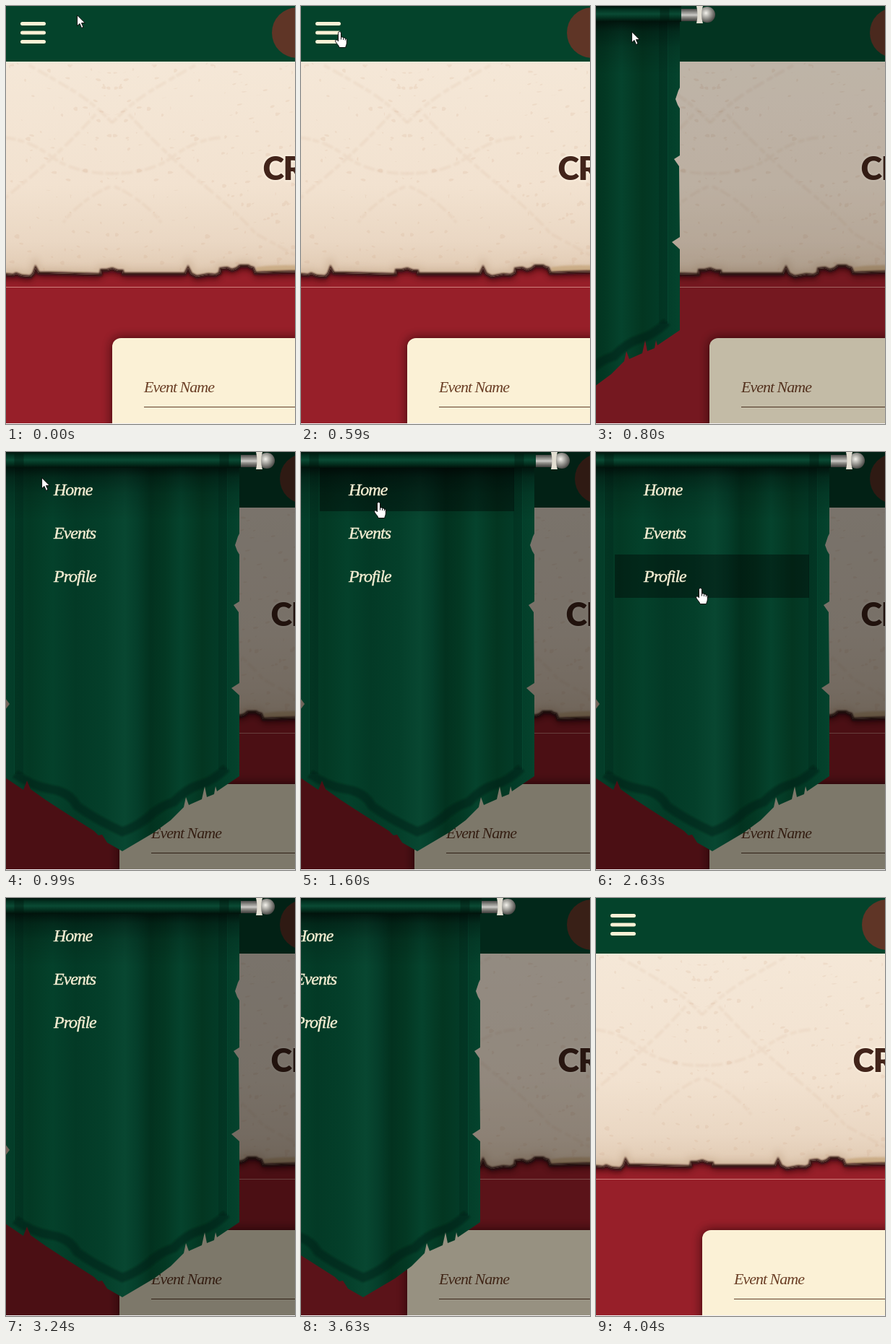
These frames come from a looping animation (400x579 px, 4230 ms). An HTML page:

```html
<!DOCTYPE html>
<html lang="en">
<head>
<meta charset="utf-8">
<title>Banner menu</title>
<style>
  html, body { margin: 0; width: 100%; height: 100%; overflow: hidden; background: #971f29; }
  svg { display: block; }
  .hand { font-family: "Liberation Serif", "Noto Serif", serif; font-style: italic; letter-spacing: -1px; }
  .title { font: 900 45px Lato, "Open Sans", sans-serif; letter-spacing: -1.5px; }
</style>
</head>
<body>
<svg width="400" height="579" viewBox="0 0 400 579">
  <defs>
    <linearGradient id="paper" x2="0" y2="1">
      <stop offset="0" stop-color="#f5e8d8"/>
      <stop offset=".6" stop-color="#f2e2d0"/>
      <stop offset=".85" stop-color="#ead7c3"/>
      <stop offset="1" stop-color="#dfc8b0"/>
    </linearGradient>
    <linearGradient id="cloth" gradientUnits="userSpaceOnUse" x1="0" x2="323" y1="0" y2="0">
      <stop offset="0" stop-color="#043e2a"/>
      <stop offset=".1" stop-color="#033924"/>
      <stop offset=".2" stop-color="#04412b"/>
      <stop offset=".3" stop-color="#033a26"/>
      <stop offset=".42" stop-color="#043f2a"/>
      <stop offset=".51" stop-color="#084731"/>
      <stop offset=".56" stop-color="#053f2b"/>
      <stop offset=".62" stop-color="#02321f"/>
      <stop offset=".68" stop-color="#033823"/>
      <stop offset=".75" stop-color="#05432d"/>
      <stop offset=".84" stop-color="#033621"/>
      <stop offset=".91" stop-color="#033b27"/>
      <stop offset="1" stop-color="#04432d"/>
    </linearGradient>
    <linearGradient id="topShade" x2="0" y2="1">
      <stop offset="0" stop-color="#000" stop-opacity=".7"/>
      <stop offset=".2" stop-color="#000" stop-opacity=".35"/>
      <stop offset=".5" stop-color="#000" stop-opacity=".14"/>
      <stop offset="1" stop-color="#000" stop-opacity="0"/>
    </linearGradient>
    <linearGradient id="rod" x2="0" y2="1">
      <stop offset="0" stop-color="#01140c"/>
      <stop offset=".2" stop-color="#02301f"/>
      <stop offset=".5" stop-color="#0a4a34"/>
      <stop offset=".75" stop-color="#03301f"/>
      <stop offset="1" stop-color="#01110a"/>
    </linearGradient>
    <linearGradient id="steel" x2="0" y2="1">
      <stop offset="0" stop-color="#4a4a48"/>
      <stop offset=".25" stop-color="#8b8a86"/>
      <stop offset=".5" stop-color="#c9c8c4"/>
      <stop offset=".7" stop-color="#85847f"/>
      <stop offset="1" stop-color="#3c3b39"/>
    </linearGradient>
    <radialGradient id="ball" cx=".42" cy=".4" r=".6">
      <stop offset="0" stop-color="#f4f2ec"/>
      <stop offset=".35" stop-color="#b9b8b2"/>
      <stop offset="1" stop-color="#4d4c49"/>
    </radialGradient>
    <filter id="soft1" x="-10%" y="-30%" width="120%" height="160%"><feGaussianBlur stdDeviation="1"/></filter>
    <filter id="soft5" x="-10%" y="-30%" width="120%" height="160%"><feGaussianBlur stdDeviation="5"/></filter>
    <filter id="soft7" x="-20%" y="-30%" width="140%" height="160%"><feGaussianBlur stdDeviation="7"/></filter>
    <path id="tear" d="M-20 60V372H0L10 373 14 371 22 374 34 375 38 371 41 363 45 370 60 370 131 372 132 366 140 366 147 364 155 367 161 367 162 371 248 371 252 363 256 371 264 375 280 372 290 373 296 370 297 364 306 363 313 366 319 364 324 360 335 360 338 362 342 363 345 370 370 369 420 368V60Z"/>
    <clipPath id="paperClip"><use href="#tear"/></clipPath>
    <path id="flag" d="M-1 12H323V113L321 117 317 129 320 137 323 142V207L315 212 322 222 323 320 312 327 323 337V449L292 470 290 463 288 474 278 478 275 463 271 481 253 489 249 478 246 492 228 510 205 527 161 553 140 541 133 530 128 531 122 525 100 511 75 495 55 482 34 467 29 455 24 468 -1 451V357L5 349 -1 341Z"/>
    <clipPath id="flagClip"><use href="#flag"/></clipPath>
    <path id="arrow" d="M.6.8V15.6L4 12.4 6.6 18.4 9 17.3 6.5 11.6H11.3Z" fill="#fff" stroke="#000" stroke-width=".9"/>
    <g id="pointer" stroke="#000" stroke-width=".9">
      <path d="M4.5 2.500a2 2 0 0 1 4 0v6c1-1 3-.6 3 .8 1-.8 2.600-.4 2.800 1 1-.4 2 .2 2 1.400V16c0 3-1.500 4-1.500 6.500H6C6 20 1.500 16.500.7 14 .2 12 2 11.200 3.400 12.600L4.500 13.800z" fill="#fff"/>
      <path d="M8.5 8.500v3M11.500 9.500v2.500M14.300 10.500v2"/>
    </g>
  </defs>

  <rect width="400" height="579" fill="#971f29"/>
  <g id="page">
    <use href="#tear" y="5" fill="#2a0508" opacity=".75" filter="url(#soft5)"/>
    <use href="#tear" fill="none" stroke="#3a1512" stroke-width="5" filter="url(#soft1)"/>
    <use href="#tear" fill="url(#paper)"/>
    <g clip-path="url(#paperClip)">
      <g id="stains" fill="#c79a78"></g>
      <use href="#tear" fill="none" stroke="#a88462" stroke-width="14" opacity=".25" filter="url(#soft5)"/>
      <path d="M346 362Q370 357 420 360V368H346Z" fill="#c2a072" opacity=".6" filter="url(#soft1)"/>
      <use href="#tear" fill="none" stroke="#3a1a12" stroke-width="4" filter="url(#soft1)"/>
    </g>
    <text class="title" x="355.500" y="241" fill="#fff6e6" stroke="#fff6e6" stroke-width="3" opacity=".7" filter="url(#soft1)">CR</text>
    <text class="title" x="355.500" y="241" fill="#42241a">CR</text>
  </g>
  <rect y="389" width="400" height="1" fill="#cf7f7c"/>
  <g id="card">
    <rect x="147" y="460" width="300" height="200" rx="12" fill="#1a0204" opacity=".75" filter="url(#soft7)"/>
    <rect x="147" y="460" width="300" height="200" rx="12" fill="#fbf1d6"/>
    <text class="hand" x="191" y="535" font-size="22" fill="#6b3f26">Event Name</text>
    <rect x="191" y="555" width="240" height="1" fill="#5f3f2b"/>
  </g>
  <rect width="400" height="77" fill="#04432b"/>
  <circle id="badge" cx="403" cy="37" r="35" fill="#5f3526"/>
  <g fill="#fbf1d6">
    <rect x="20" y="22" width="35" height="5" rx="2.5"/>
    <rect x="20" y="34.5" width="35" height="5" rx="2.5"/>
    <rect x="20" y="47" width="35" height="5" rx="2.5"/>
  </g>

  <rect id="dim" width="400" height="579"/>

  <g id="banner">
    <use href="#flag" fill="url(#cloth)"/>
    <g clip-path="url(#flagClip)">
      <g fill="none" stroke="#011d12" stroke-width="12">
        <path d="M18 20V446M300 20V440" opacity=".22"/>
        <path d="M13 446Q36 463 62 467T98 490Q122 508 161 526 184 518 205 499 218 489 232 485 250 466 268 461T305 438" opacity=".45" filter="url(#soft1)"/>
      </g>
      <path d="M11.5 20V446M306.5 20V440" stroke="#0b5a3f" opacity=".3"/>
      <rect y="20" width="323" height="75" fill="url(#topShade)"/>
    </g>
    <rect x="-10" width="335" height="22" fill="url(#rod)"/>
    <path d="M18 2V21M302 2V21" stroke="#01170e" stroke-width="13" opacity=".4"/>
    <rect x="325" y="4" width="23" height="17" fill="url(#steel)"/>
    <circle cx="361" cy="12" r="11" fill="url(#ball)"/>
    <path d="M346 0H355Q351 12 355 24H346Q349 12 346 0Z" fill="#e2ded2"/>
    <rect id="hover" x="26" width="269" height="60" opacity=".38"/>
    <g class="hand" font-size="24" fill="#f5eed3" stroke="#f5eed3" stroke-width=".4">
      <text x="66" y="60">Home</text>
      <text x="66" y="120">Events</text>
      <text x="66" y="180">Profile</text>
    </g>
  </g>

  <use id="cursor"/>
  <rect y="578" width="400" height="1" fill="#f2f0f2"/>
</svg>
<script>
  const LOOP = 4230, HIDDEN = -373;
  const el = id => document.getElementById(id);

  // start time, cursor, x, y, banner offset, hovered item
  const steps = [
    [0, "arrow", 98, 12, HIDDEN, -1],
    [180, "arrow", 63, 25, HIDDEN, -1],
    [380, "pointer", 43, 36, HIDDEN, -1],
    [590, "pointer", 47, 35, HIDDEN, -1],
    [800, "arrow", 49, 35, -207, -1],
    [990, "arrow", 49, 35, 0, -1],
    [1190, "arrow", 52, 35, 0, -1],
    [1390, "pointer", 77, 45, 0, 0],
    [1600, "pointer", 101, 69, 0, 0],
    [1800, "pointer", 116, 103, 0, 1],
    [2020, "pointer", 123, 126, 0, 1],
    [2220, "pointer", 124, 148, 0, 2],
    [2430, "pointer", 129, 172, 0, 2],
    [2630, "pointer", 138, 188, 0, 2],
    [2830, "pointer", 168, 199, 0, 2],
    [3030, "arrow", 316, 247, 0, -1],
    [3240, "", 0, 0, 0, -1],
    [3630, "", 0, 0, -75, -1],
    [3840, "", 0, 0, -195, -1],
    [4040, "", 0, 0, HIDDEN, -1]
  ];

  // Paper flecks and creases, mirrored about x = 147
  function stains() {
    let seed = 7;
    const rnd = (a, b) => {
      seed = (seed * 16807) % 2147483647;
      return +(a + (b - a) * seed / 2147483647).toFixed(1);
    };
    let flecks = "";
    for (let i = 0; i < 190; i++) {
      const w = rnd(1, 8), h = rnd(.5, 3);
      flecks += `M${rnd(147, 425)} ${rnd(80, 365)}q${w / 2} ${-h} ${w} ${rnd(-2, 2)}q${-w / 3} ${h * 1.5} ${-w} ${h}z`;
    }
    const creases = "M147 162Q172 135 200 118T262 82M147 232Q200 232 232 208T300 182M170 150Q215 200 270 245T345 315L400 345M150 250Q190 268 215 300";
    const half = `<path d="${flecks}" opacity=".15"/>
      <path d="${creases}" fill="none" stroke="#c79a78" stroke-width="4" stroke-dasharray="9 3 16 5" opacity=".1" filter="url(#soft1)"/>`;
    el("stains").innerHTML = `<g>${half}</g><g transform="matrix(-1 0 0 1 294 0)">${half}</g>`;
  }

  const move = (id, x, y = 0) => el(id).setAttribute("transform", `translate(${x} ${y})`);
  const show = (id, on) => el(id).setAttribute("visibility", on ? "visible" : "hidden");

  let current;
  function draw(time) {
    const step = steps.findLast(s => s[0] <= time);
    if (step === current) return;
    current = step;
    const [start, cursor, x, y, offset, item] = step;
    // The page widens while the open menu hides the scrollbar
    const open = start >= 800 && start < 3630;
    move("page", open ? 11 : 0);
    move("badge", open ? 11 : 0);
    move("card", open ? 10 : 0);
    el("dim").setAttribute("opacity", .5 * (1 - offset / HIDDEN));
    move("banner", offset);
    show("banner", offset > HIDDEN);
    el("hover").setAttribute("y", 22 + 60 * item);
    el("hover").setAttribute("display", item < 0 ? "none" : "inline");
    show("cursor", cursor);
    if (cursor) {
      el("cursor").setAttribute("href", "#" + cursor);
      move("cursor", x, y);
    }
  }

  stains();
  const begin = performance.now();
  function tick() {
    draw((performance.now() - begin) % LOOP);
    requestAnimationFrame(tick);
  }
  tick();
</script>
</body>
</html>
```
